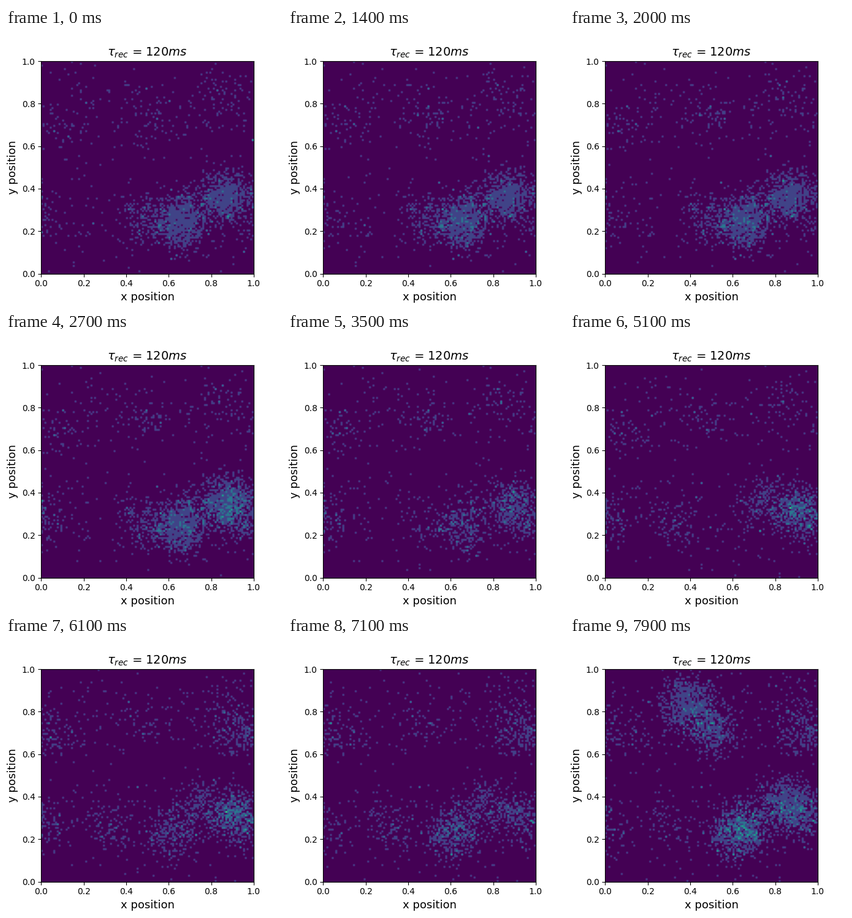
A matplotlib script for the animation above (8 s loop, 450 px wide and 450 px high).

```python
import numpy as np
import matplotlib.pyplot as plt
from matplotlib.animation import FuncAnimation

N = 120            # neurons per side of the periodic sheet
FRAMES = 80
INTERVAL = 100
WINDOW = 40        # frames a spike stays in the count
BURST_LENGTH = 6   # frames over which a burst recruits its cells
BURST_WIDTH = .06
NOISE_RATE = 8     # background spikes per frame

# places on the sheet where activity bumps form
LOWER, INNER, TAIL, FAR = (.66, .25), (.61, .23), (.48, .26), (.33, .24)
RIGHT, EDGE, BRIDGE = (.87, .36), (.92, .31), (.76, .35)
CORNER, TOP, MIDDLE = (.94, .71), (.39, .84), (.51, .71)

# first frame, strength, places that fire together
WAVES = [
    (-8, 2.4, [LOWER, RIGHT]),
    (-8, .4, [TAIL]),
    (4, .15, [LOWER]),
    (22, 1.1, [EDGE]),
    (37, .65, [EDGE, BRIDGE]),
    (37, .3, [FAR]),
    (54, .65, [INNER, CORNER]),
    (65, .5, [INNER]),
    (73, 2.2, [TOP, RIGHT]),
    (73, 1.1, [LOWER, MIDDLE]),
]

# places that keep firing single spikes
SIMMERING = [(.5, .74), (.86, .85), (.1, .7), (.02, .25)]

rng = np.random.default_rng(7)
centres = (np.arange(N) + .5) / N
gx, gy = np.meshgrid(centres, centres)


def wrap(d):
    return (d + .5) % 1 - .5


def burst(place, strength, first):
    """Cells that fire once around a place, and when."""
    r2 = (wrap(gx - place[0]) ** 2 + wrap(gy - place[1]) ** 2) / BURST_WIDTH ** 2
    chance = 1 - np.exp(-strength * np.exp(-r2 / 2))
    cells = np.flatnonzero(rng.random((N, N)) < chance)
    return cells, first + rng.integers(0, BURST_LENGTH, cells.size)


def noise():
    """Background spikes, denser in two horizontal bands."""
    births = np.repeat(np.arange(-WINDOW, FRAMES), NOISE_RATE)
    weight = 1 + .6 * np.cos(4 * np.pi * (gy - .78))
    cells = rng.choice(N * N, births.size, p=(weight / weight.sum()).ravel())
    return cells, births


def simmer(place):
    births = np.arange(-WINDOW, FRAMES)
    col, row = ((rng.normal(p, .06, births.size) % 1 * N).astype(int) % N
                for p in place)
    return row * N + col, births


spikes = [noise()]
spikes += [simmer(place) for place in SIMMERING]
spikes += [burst(place, strength, first)
           for first, strength, places in WAVES for place in places]
cells, births = (np.concatenate(part) for part in zip(*spikes))


def counts(frame):
    age = frame - births
    live = (age >= 0) & (age < WINDOW)
    return np.bincount(cells[live], minlength=N * N).reshape(N, N)


fig, ax = plt.subplots(figsize=(4.5, 4.5), dpi=100)
image = ax.imshow(counts(0), origin="lower", extent=(0, 1, 0, 1),
                  cmap="viridis", vmin=0, vmax=5)
ax.set_title(r"$\tau_{rec}$ = $\mathit{120ms}$", fontsize=14)
ax.set_xlabel("x position", fontsize=13)
ax.set_ylabel("y position", fontsize=13)


def update(frame):
    image.set_data(counts(frame))
    return [image]


anim = FuncAnimation(fig, update, frames=FRAMES, interval=INTERVAL,
                     repeat=True, repeat_delay=0)
plt.show()
```
